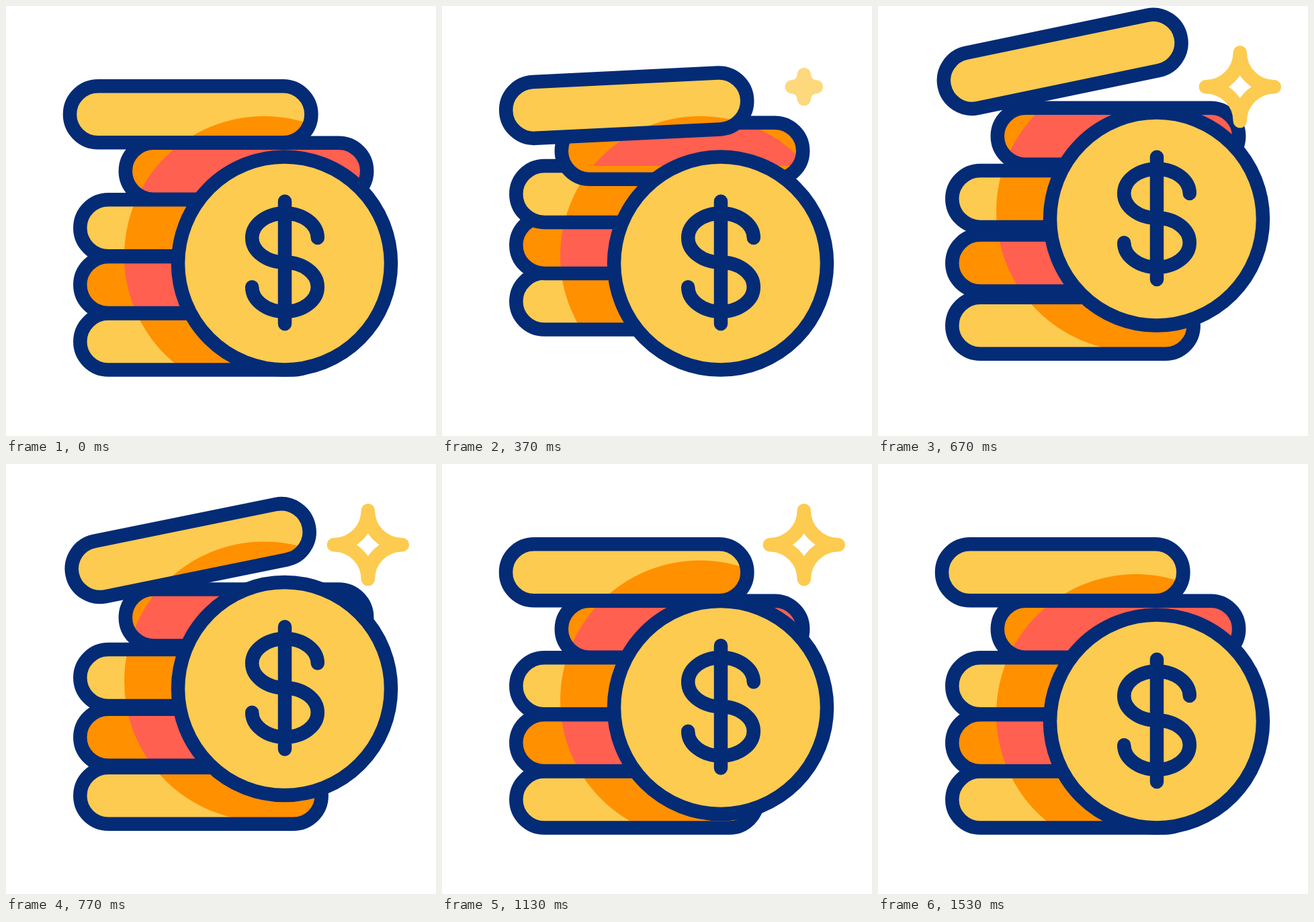
Write an HTML page with a canvas that moves like this. It is 640 by 640 pixels and loops after 2000 ms.

```html
<!DOCTYPE html>
<html lang="en">
<head>
<meta charset="utf-8">
<title>Coin stack</title>
<style>
  html, body { margin: 0; width: 100%; height: 100%; overflow: hidden; background: #fff; }
  canvas { display: block; width: 640px; height: 640px; }
</style>
</head>
<body>
<canvas id="stage" width="640" height="640"></canvas>
<script>
const ctx = document.getElementById('stage').getContext('2d');
const NAVY = '#042b76', YELLOW = '#fccb50', ORANGE = '#ff9000', RED = '#ff6050';
const LINE = 20.5, LOOP = 2000, TAU = Math.PI * 2;

// Ease in-out equal to cubic-bezier(.5, 0, .5, 1)
function ease(x) {
  let lo = 0, hi = 1;
  for (let i = 0; i < 24; i++) {
    const m = (lo + hi) / 2;
    if (1.5 * m * (1 - m) + m * m * m < x) lo = m; else hi = m;
  }
  return lo * lo * (3 - 2 * lo);
}
const linear = x => x;

// Value of a [tick, value] track at tick n (30 ticks per second)
function track(keys, n, curve = ease) {
  if (n <= keys[0][0]) return keys[0][1];
  for (let i = 1; i < keys.length; i++) {
    const [a, from] = keys[i - 1], [b, to] = keys[i];
    if (n < b) return from + (to - from) * curve((n - a) / (b - a));
  }
  return keys[keys.length - 1][1];
}

const hop = (start, peak, drop, height) =>
  [[start, 0], [peak, -height], [drop, -height], [26.5, 0]];

// Bottom to top; later bars cover earlier ones
const bars = [
  { x: 290, y: 499.6, fill: YELLOW, shade: ORANGE, lift: hop(0, 10, 12, 60) },
  { x: 290, y: 415, fill: ORANGE, shade: RED, lift: hop(2, 12, 14, 60) },
  { x: 290, y: 330.3, fill: YELLOW, shade: ORANGE, lift: hop(4, 14, 16, 60) },
  { x: 357.5, y: 245.8, fill: ORANGE, shade: RED, lift: hop(6, 16, 17.5, 60),
    mask: hop(4, 16, 17.5, 60) },
  { x: 274.7, y: 161.3, fill: YELLOW, shade: ORANGE, lift: hop(8, 18, 18.7, 82),
    tilt: [[5, 0], [22, -12], [28, 0]] }
];
const coinLift = [[12, 0], [20, -66], [28, 0], [34, -20.5], [40, 0]];
const starSize = [[8, 0], [16, 67.7], [20, 51], [34, 51], [38, 67.7], [46, 0]];
const starAlpha = [[8, 0], [12, 1], [42, 1], [46, 0]];

function barPath(x, y, angle) {
  const p = new Path2D(), m = new DOMMatrix().translate(x, y).rotate(angle);
  const shape = new Path2D();
  shape.roundRect(-179.7, -42, 359.4, 84, 42);
  p.addPath(shape, m);
  return p;
}

function disc(x, y, r, fill) {
  ctx.beginPath();
  ctx.arc(x, y, r, 0, TAU);
  ctx.fillStyle = fill;
  ctx.fill();
}

function drawBar(bar, n, coinY) {
  const y = bar.y + track(bar.lift, n);
  const path = barPath(bar.x, y, bar.tilt ? track(bar.tilt, n) : 0);
  ctx.fillStyle = bar.fill;
  ctx.fill(path);
  ctx.save();
  ctx.clip(path);
  if (bar.mask) {
    ctx.beginPath();
    ctx.rect(0, 0, 640, bar.y + track(bar.mask, n) + 32 + (n >= 12 || n < 4 ? 9 : 0));
    ctx.clip();
  }
  disc(384, coinY - 11, 208, bar.shade);
  ctx.restore();
  ctx.strokeStyle = NAVY;
  ctx.stroke(path);
}

function drawCoin(y) {
  disc(414.5, y, 158.5, YELLOW);
  ctx.strokeStyle = NAVY;
  ctx.stroke();
  ctx.save();
  ctx.translate(415, y);
  ctx.beginPath();
  ctx.moveTo(0, -92.3);
  ctx.lineTo(0, 90);
  ctx.moveTo(48.8, -38);
  ctx.ellipse(0, -38, 48.8, 36.6, 0, 0, Math.PI / 2, true);
  ctx.ellipse(0, 35.2, 48.8, 36.6, 0, -Math.PI / 2, Math.PI);
  ctx.stroke();
  ctx.restore();
}

function drawStar(n) {
  const r = track(starSize, n), alpha = track(starAlpha, n, linear);
  if (alpha <= 0 || r <= 0) return;
  ctx.save();
  ctx.translate(538.8, 120.3);
  ctx.globalAlpha = alpha;
  ctx.strokeStyle = YELLOW;
  ctx.beginPath();
  ctx.moveTo(0, -r);
  ctx.arc(r, -r, r, Math.PI, Math.PI / 2, true);
  ctx.arc(r, r, r, -Math.PI / 2, -Math.PI, true);
  ctx.arc(-r, r, r, 0, -Math.PI / 2, true);
  ctx.arc(-r, -r, r, Math.PI / 2, 0, true);
  ctx.closePath();
  ctx.stroke();
  ctx.restore();
}

function draw(ms) {
  const n = Math.floor((ms % LOOP) * 0.03 + 0.11);
  const coinY = 383 + track(coinLift, n);
  ctx.fillStyle = '#fff';
  ctx.fillRect(0, 0, 640, 640);
  ctx.lineWidth = LINE;
  ctx.lineCap = ctx.lineJoin = 'round';
  for (const bar of bars) drawBar(bar, n, coinY);
  drawCoin(coinY);
  drawStar(n);
}

const start = performance.now();
function loop() {
  draw(performance.now() - start);
  requestAnimationFrame(loop);
}
loop();
</script>
</body>
</html>
```
